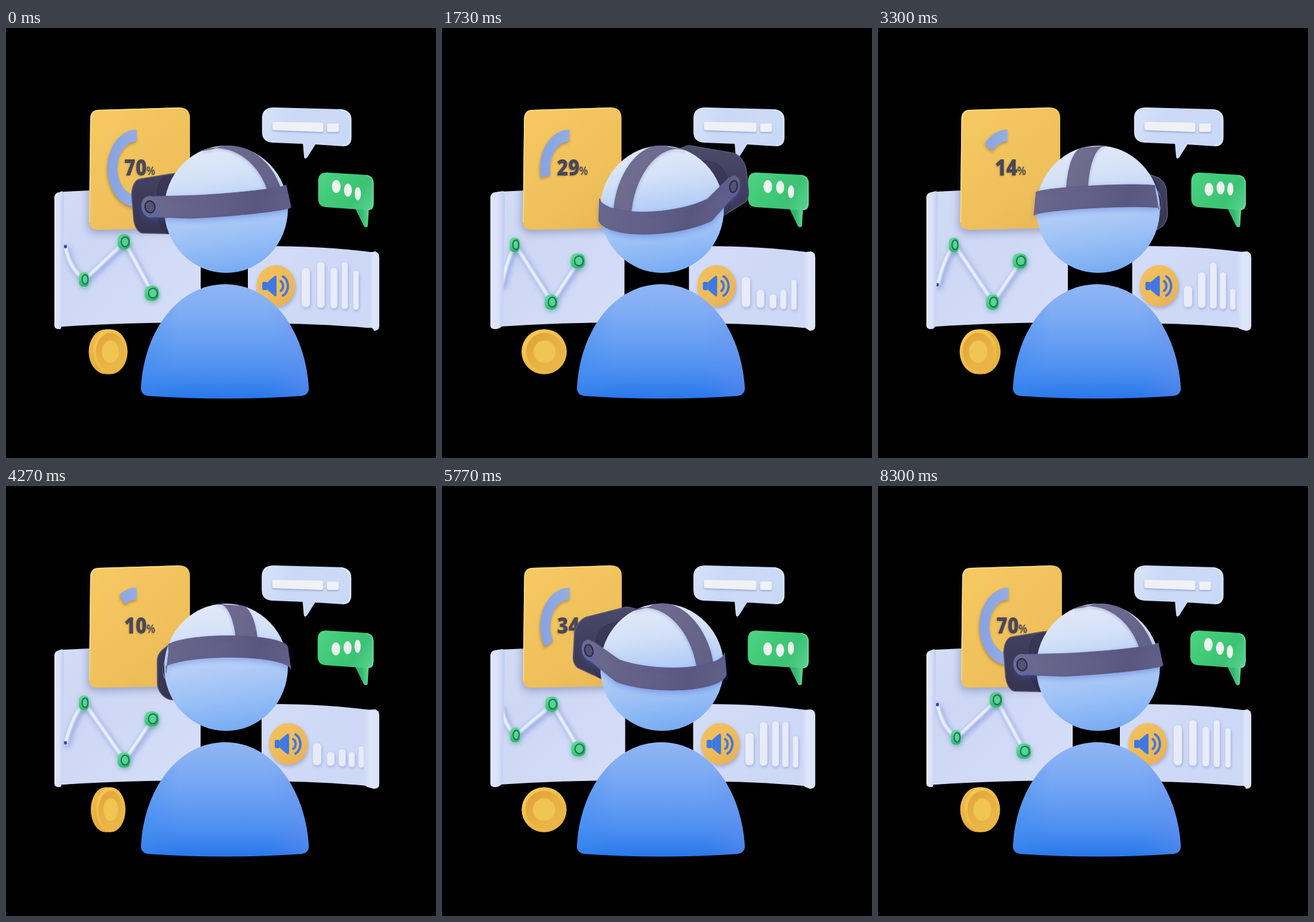
Animation of 720 by 720 pixels, one loop 8.33 s. Source, as an HTML page with a canvas:

```html
<!DOCTYPE html>
<html>
<head>
<meta charset="utf-8">
<style>
html, body { margin: 0; width: 100%; height: 100%; overflow: hidden; background: #000; }
canvas { display: block; width: 720px; height: 720px; }
</style>
</head>
<body>
<canvas id="stage" width="720" height="720"></canvas>
<script>
const ctx = document.getElementById('stage').getContext('2d');
const LOOP = 8330, TAU = Math.PI * 2, RAD = Math.PI / 180;

// Smooth periodic tracks through a few poses
const TIMES = [0, 1070, 2370, 4270, 5770, 6970, LOOP];
const GAUGE = [70, 39, 22, 10, 34, 62, 70];
const YAW = [-55, 28, 47, -20, -45, -52, -55];
const PITCH = [3.5, 26, 8.8, -11.5, 18, 6.6, 3.5];
const ROLL = [4.6, 7.5, 4.8, 0.5, -3, 1.5, 4.6];

function track(v, t) {
  const n = TIMES.length - 1;
  const slope = i => { const j = (i + n) % n; return (v[j + 1] - v[j]) / (TIMES[j + 1] - TIMES[j]); };
  const tangent = i => {
    const a = slope(i - 1), b = slope(i);
    return a * b <= 0 ? 0 : 2 * a * b / (a + b);
  };
  let i = 0;
  while (i < n - 1 && t >= TIMES[i + 1]) i++;
  const h = TIMES[i + 1] - TIMES[i], u = (t - TIMES[i]) / h, w = 1 - u;
  return w * w * (1 + 2 * u) * v[i] + u * u * (3 - 2 * u) * v[i + 1] +
    h * u * w * (w * tangent(i) - u * tangent(i + 1));
}

const wave = (t, cycles, shift = 0) => Math.cos(TAU * (cycles * t / LOOP + shift));
const mix = (a, b, u) => a + (b - a) * u;
function ease(u) {
  u = Math.min(1, Math.max(0, u));
  return u < 0.5 ? 4 * u * u * u : 1 - 4 * (1 - u) ** 3;
}

function ramp(x0, y0, x1, y1, ...colors) {
  const g = ctx.createLinearGradient(x0, y0, x1, y1);
  colors.forEach((c, i) => g.addColorStop(i / (colors.length - 1), c));
  return g;
}
function fillPath(d, style) {
  ctx.fillStyle = style;
  ctx.fill(new Path2D(d));
}
function oval(x, y, rx, ry, style) {
  ctx.beginPath();
  ctx.ellipse(x, y, rx, ry, 0, 0, TAU);
  ctx.fillStyle = style;
  ctx.fill();
}
function ring(x, y, rx, ry, style, width) {
  ctx.beginPath();
  ctx.ellipse(x, y, rx, ry, 0, 0, TAU);
  ctx.strokeStyle = style;
  ctx.lineWidth = width;
  ctx.stroke();
}
function pill(x, y, w, h, r, style) {
  ctx.beginPath();
  ctx.roundRect(x, y, w, h, r);
  ctx.fillStyle = style;
  ctx.fill();
}
function shade(color, blur, x, y) {
  ctx.shadowColor = color;
  ctx.shadowBlur = blur;
  ctx.shadowOffsetX = x;
  ctx.shadowOffsetY = y;
}
const unshade = () => shade('transparent', 0, 0, 0);

function chartPanel(t) {
  const s = wave(t, 2), right = 315 + 11 * s, tab = 101.5 - 4.5 * s;
  fillPath(`M81 283Q82 276 98 274L140 272L${right} 268V493Q200 493 96 500L82 500Z`,
    ramp(81, 274, 300, 495, '#d3dcf5', '#cdd7f4', '#d1daf6', '#d6def8'));

  const p = t < 4200 ? ease(t / 1040) : 1 - ease((t - 4700) / 1450);
  const nodes = [
    [126.7 + 4.7 * s, mix(421, 363, p), 8, 12],
    [190.5 + 8 * s, mix(358, 459, p), 10.5, 12.5],
    [236 + 9 * s, mix(444, 390, p), 12, 12.5]
  ];
  const start = [99.5, mix(366, 430, p)];
  const line = () => {
    ctx.beginPath();
    ctx.moveTo(...start);
    ctx.quadraticCurveTo(mix(105, 112, p) + s, mix(403, 379, p), nodes[0][0], nodes[0][1]);
    nodes.forEach(n => ctx.lineTo(n[0], n[1]));
    ctx.stroke();
  };
  ctx.lineCap = ctx.lineJoin = 'round';
  shade('rgba(70,100,200,.4)', 9, 3, 4);
  ctx.strokeStyle = '#c0cdf2';
  ctx.lineWidth = 9;
  line();
  unshade();
  ctx.strokeStyle = '#e6ecfa';
  ctx.lineWidth = 5;
  line();
  oval(start[0], start[1], 2.5, 3, '#2a4bbb');

  for (const [x, y, rx, ry] of nodes) {
    shade('rgba(40,140,110,.45)', 9, 1, 3);
    pill(x - rx - 1, y - ry, rx * 2, ry * 2, rx * 0.8, ramp(x - rx, y - ry, x + rx, y + ry, '#72dba2', '#3cc580', '#2baa6a'));
    unshade();
    ring(x + 1, y, rx * 0.62, ry * 0.66, '#147a49', 2);
    oval(x + 1, y, rx * 0.45, ry * 0.5, '#5cd096');
  }

  const tabFill = ramp(81, 0, tab, 0, '#e2e8fb', '#dbe2f9', '#c0cbee');
  fillPath(`M81 285Q81 276 89 275L${tab - 3} 273Q${tab + 1} 277 ${tab} 290L${tab - 3} 492Q${tab - 4} 503 91 504Q81 505 81 498Z`, tabFill);
}

function gaugePanel(t) {
  const s = wave(t, 2), l = 137 + 2 * s, r = 304 + 4 * s, cx = 216 + 3 * s;
  shade('rgba(20,35,100,.3)', 14, -2, 5);
  fillPath(`M${l + 2} 152Q${l + 2} 138 ${l + 15} 137L${r - 18} 133Q${r} 133 ${r} 151V320Q${r} 335 ${r - 15} 335L${l + 14} 338Q${l} 337 ${l} 324Z`,
    ramp(l, 135, r, 338, '#f6ca62', '#f2c45e', '#eebf5a', '#e8b755'));
  unshade();
  ctx.strokeStyle = 'rgba(250,220,135,.8)';
  ctx.lineWidth = 2;
  ctx.stroke(new Path2D(`M${l + 1} 325L${l + 3} 152Q${l + 4} 139 ${l + 16} 138L${r - 18} 134`));

  const value = track(GAUGE, t), end = -Math.PI / 2 - TAU * value / 100;
  ctx.save();
  ctx.translate(cx, 235);
  ctx.beginPath();
  ctx.ellipse(0, 0, 49, 65, 0, -Math.PI / 2, end, true);
  ctx.ellipse(0, 0, 32.5, 45, 0, end, -Math.PI / 2);
  ctx.closePath();
  shade('rgba(120,90,60,.5)', 5, -1, 3);
  ctx.fillStyle = ramp(-49, 0, 8, 0, '#86a2e2', '#97afe4');
  ctx.fill();
  shade('rgba(130,95,40,.5)', 3, -1, 1);
  ctx.scale(0.87, 1); // the panel is seen slightly from the side
  ctx.fillStyle = '#4a4757';
  ctx.textBaseline = 'alphabetic';
  ctx.font = '800 37px "Open Sans", sans-serif';
  ctx.fillText(Math.round(value), -24, 12);
  ctx.font = '600 20px "Open Sans", sans-serif';
  ctx.fillText('%', 18.5, 11);
  ctx.restore();
}

function soundPanel(t) {
  const s = wave(t, 1), l = 416.5 - 11.5 * s, tab = 602 + 5 * s, cx = 462.5 - 10.5 * s;
  fillPath(`M${l} 365Q530 364 618 376V502L604 502Q530 495 ${l} 494Z`,
    ramp(l, 365, 620, 500, '#d4dcf7', '#d0daf6', '#ccd8f6', '#cfdaf6'));

  shade('rgba(90,100,170,.4)', 6, 1, 3);
  oval(cx, 432, 32.5, 35, ramp(cx - 30, 405, cx + 30, 465, '#f2c05c', '#eebb5a', '#e6b058'));
  unshade();
  const blue = '#3f78e2';
  pill(cx - 23, 425, 9, 14, 3, blue);
  fillPath(`M${cx - 14} 425L${cx - 2} 415Q${cx + 1} 414 ${cx + 1} 418V446Q${cx + 1} 450 ${cx - 2} 449L${cx - 14} 439Z`, blue);
  ctx.strokeStyle = blue;
  ctx.lineWidth = 4;
  ctx.lineCap = 'round';
  [[7, 9], [15, 18]].forEach(([rx, ry]) => {
    ctx.beginPath();
    ctx.ellipse(cx + 5, 432, rx, ry, 0, -1.1, 1.1);
    ctx.stroke();
  });

  const mids = [511.5, 535.5, 556, 573, 590.5];
  const shifts = [0.14, 0, -0.14, 0, 0.14];
  mids.forEach((m, i) => {
    const x = m - (9.5 - 1.25 * i) * s, w = 14 - 1.25 * i;
    const top = 419 + (i === 4 ? 5 : 0) - 27 * wave(t, 3, shifts[i]);
    shade('rgba(80,100,190,.4)', 5, 1, 2);
    pill(x - w / 2, top, w, 467.5 + i - top, w * 0.45, '#e8ebf8');
  });
  unshade();

  fillPath(`M${tab} 384Q${tab} 375 ${tab + 7} 375L618 374Q625 376 625 384V499Q625 507 616 507L${tab + 8} 504Q${tab + 4} 503 ${tab + 3} 495Z`,
    ramp(tab, 0, 625, 0, '#cad5f4', '#dfe6fb', '#d9e1f9'));
}

function bubbles(t) {
  const a = -Math.cos(TAU * (t - 1640) / (LOOP / 2));
  const l = 425.3 + 4.3 * a, r = 576.3 + 2.8 * a, m = 502 + 4 * a;
  fillPath(`M${l} 151Q${l} 133 ${l + 20} 133L${r - 18} 136Q${r} 138 ${r} 153V183Q${r} 198 ${r - 14} 198L${m + 13} 195L${m - 1} 217Q${m - 5} 221 ${m - 6} 216L${m - 8} 194L${l + 18} 192Q${l} 191 ${l} 174Z`,
    ramp(l, 133, r, 198, '#d9e4f9', '#c9d8f6', '#ccdaf7', '#c6d8f8'));
  ctx.strokeStyle = 'rgba(228,238,252,.75)';
  ctx.lineWidth = 2;
  ctx.stroke(new Path2D(`M${r - 16} 137Q${r - 2} 140 ${r - 2} 155V182Q${r - 2} 196 ${r - 14} 197`));
  const x = l + 17.5, e = r - 21;
  shade('rgba(80,105,180,.4)', 3, 0, 2);
  fillPath(`M${x} 160Q${x} 157 ${x + 3} 157L${e - 29} 158.5Q${e - 26} 159 ${e - 26} 162V171Q${e - 26} 174 ${e - 29} 174L${x + 3} 171Q${x} 171 ${x} 168Z`, '#f0f1f4');
  pill(e - 20, 160, 20, 14, 3, '#f0f1f4');
  unshade();

  const b = -Math.cos(TAU * (t - 1500) / (LOOP / 2));
  const gl = 518.5 + 6.5 * b, gr = 615 + b, gm = 600.5 + 2 * b;
  fillPath(`M${gm - 18} 300L${gm - 3} 331Q${gm} 336 ${gm + 4} 332L${gm + 6} 300Z`, ramp(gm - 18, 0, gm + 6, 0, '#2fae66', '#36b96f', '#62d796'));
  fillPath(`M${gl} 257Q${gl} 242 ${gl + 14} 242L${gr - 12} 246Q${gr} 248 ${gr} 260V294Q${gr} 306 ${gr - 10} 305L${gl + 13} 300Q${gl} 299 ${gl} 285Z`,
    ramp(gl, 242, gr, 306, '#4fd385', '#41cb78', '#3cc274', '#5bd492'));
  ctx.strokeStyle = 'rgba(120,228,165,.6)';
  ctx.stroke(new Path2D(`M${gr - 11} 247Q${gr - 1} 250 ${gr - 1} 261V293Q${gr - 2} 304 ${gr - 10} 304`));
  [[550, 269, 4.7, 7.3, 0.1], [570, 271, 4, 6.7, 0.27], [587.2, 273, 3, 5.2, 0.5]].forEach(([dx, dy, k, rx, lag]) =>
    oval(dx + k * b, dy - 4.5 * wave(t, 1, -lag), rx, 11, '#eaf3ec'));
}

function coin(t) {
  const a = 40 * RAD + TAU * 2 * t / LOOP;
  let c = Math.cos(a), e = Math.sin(a);
  if (c < 0) { c = -c; e = -e; }
  const x = 171, y = 542, rx = Math.max(1, 37.5 * c), off = 6 * e;
  // edge: rear rim swept to the front face
  const edge = ramp(x - 38, y - 30, x + 38, y + 30, '#f0c050', '#e6ad3c', '#eab648');
  oval(x - off, y, rx, 37.5, edge);
  ctx.fillStyle = edge;
  ctx.fillRect(x - Math.abs(off), y - 37.5, Math.abs(off) * 2, 75);
  oval(x + off, y, rx, 37.5, ramp(x - 30, y - 38, x + 30, y + 38, '#f5cd5c', '#efbd48', '#e8b142'));
  oval(x + off, y, rx * 0.84, 31.5, ramp(x - 25, y - 30, x + 25, y + 30, '#e0a238', '#e8b043', '#ecb84a'));
  oval(x + off, y, rx * 0.5, 19, '#f0c552');
}

function torso() {
  const d = 'M226 603C231 505 290 429 367 429C444 429 501 505 507 603Q507 614 495 616Q367 625 238 616Q226 614 226 603Z';
  fillPath(d, ramp(367, 429, 367, 620, '#8fb5f4', '#7facf4', '#689ff3', '#4d90f1', '#2a78ea'));
  fillPath(d, ramp(226, 0, 290, 0, 'rgba(60,140,240,.4)', 'rgba(60,140,240,0)'));
  fillPath(d, ramp(440, 0, 507, 0, 'rgba(110,140,235,0)', 'rgba(110,140,235,.4)'));
}

// Head gear in local axes: x right, y up, z forward; the viewer sees the back
const LIFT = 14;
const strap = [];
for (let i = 0; i <= 6; i++) strap.push([mix(-68, -108, i / 6), mix(107, 0, i / 6), -0.955, 0.295, mix(17, 19, i / 6)]);
for (let i = 1; i < 48; i++) {
  const a = (i / 48 - 0.5) * Math.PI, sn = Math.sin(a), cs = Math.cos(a);
  strap.push([108 * sn, -108 * cs, sn, -cs, 19]);
}
for (let i = 0; i <= 6; i++) strap.push([mix(108, 68, i / 6), mix(0, 107, i / 6), 0.955, 0.295, mix(19, 17, i / 6)]);

function hull(pts) {
  pts.sort((a, b) => a[0] - b[0] || a[1] - b[1]);
  const half = list => list.reduce((h, p) => {
    while (h.length > 1) {
      const [a, b] = h.slice(-2);
      if ((b[0] - a[0]) * (p[1] - a[1]) - (b[1] - a[1]) * (p[0] - a[0]) > 0) break;
      h.pop();
    }
    h.push(p);
    return h;
  }, []);
  return half(pts).slice(0, -1).concat(half(pts.slice().reverse()).slice(0, -1));
}
function poly(pts, style, line, width = 1) {
  if (pts.length < 3) return;
  ctx.beginPath();
  pts.forEach(p => ctx.lineTo(p[0], p[1]));
  ctx.closePath();
  ctx.fillStyle = style;
  ctx.fill();
  if (line) {
    ctx.strokeStyle = line;
    ctx.lineWidth = width;
    ctx.stroke();
  }
}

function head(t) {
  const [yaw, pitch, roll] = [YAW, PITCH, ROLL].map(v => track(v, t) * RAD);
  const turn = (x, y, z) => {
    const X = x * Math.cos(yaw) + z * Math.sin(yaw), Z = x * Math.sin(yaw) - z * Math.cos(yaw);
    const Y = y * Math.cos(pitch) - Z * Math.sin(pitch);
    return [X * Math.cos(roll) - Y * Math.sin(roll), Y * Math.cos(roll) + X * Math.sin(roll), Z * Math.cos(pitch) + y * Math.sin(pitch)];
  };
  const place = (x, y, z) => {
    const p = turn(x, y, z);
    return [369 + p[0], 303.5 - p[1]];
  };
  const strapFill = ramp(235, 270, 477, 320, '#6f6d90', '#67648a', '#625f88', '#5a577f', '#63608a');

  const slab = (z, k) => {
    const pts = [];
    for (let i = 0; i < 60; i++) {
      const a = TAU * (i + 0.5) / 60, c = Math.cos(a), s = Math.sin(a);
      pts.push(place(k * (Math.sign(c) * 47 + 29 * c), LIFT + k * (Math.sign(s) * 19 + 29 * s), z));
    }
    return pts;
  };
  const back = slab(85, 1);
  poly(hull(back.concat(slab(140, 0.95))), ramp(0, 190, 0, 350, '#4e4c6c', '#3f3d5c', '#36344f'), '#5b5978', 1.5);
  poly(back, ramp(0, 190, 0, 350, '#42405c', '#383654', '#32304c'), '#302e48');

  // the strap follows the round of the head
  const onHead = (p, y) => {
    const k = Math.sqrt(1 - (y / 109) ** 2);
    return place(p[0] * k, y, p[1] * k);
  };
  const drawStrap = minZ => {
    const run = strap.filter(p => turn(p[2], 0, p[3])[2] > 0 && turn(p[0], LIFT, p[1])[2] > minZ);
    const top = run.map(p => onHead(p, LIFT + p[4]));
    const low = run.map(p => onHead(p, LIFT - p[4]));
    poly(top.concat(low.reverse()), strapFill, '#5c5980', 0.7);
    for (const side of [-1, 1]) {
      if (turn(side, 0, 0)[2] <= 0.05 || turn(side * 68, LIFT, 107)[2] <= minZ) continue;
      const disc = (r, out) => Array.from({ length: 32 }, (_, i) =>
        place(side * (68 + out), LIFT + r * Math.sin(i * TAU / 32), 107 + r * Math.cos(i * TAU / 32)));
      poly(disc(18, 0), strapFill);
      poly(disc(10, 1), '#55536f', '#29273d', 2);
    }
  };
  drawStrap(-200);

  oval(368.5, 303.5, 103.5, 106.5, ramp(350, 197, 380, 410, '#e2e9f8', '#d3e1f7', '#b3cdf7', '#98bff6', '#78abf3'));

  const left = [], right = [];
  for (let b = 4; b <= 176; b += 3) {
    const s = Math.sin(b * RAD), c = -Math.cos(b * RAD);
    if (turn(0, s, c)[2] < -0.12) continue;
    left.push(place(-19, 105 * s, 105 * c));
    right.push(place(19, 105 * s, 105 * c));
  }
  ctx.save();
  ctx.beginPath();
  ctx.ellipse(368.5, 303.5, 104.5, 107.5, 0, 0, TAU);
  ctx.clip();
  shade('rgba(70,90,180,.35)', 5, 0, 2);
  poly(left.concat(right.reverse()), ramp(300, 197, 450, 310, '#73718f', '#6b688c', '#625f88'), '#5f5c82', 0.8);
  ctx.restore();

  shade('rgba(60,90,200,.35)', 8, 0, 4);
  drawStrap(-35);
  unshade();
}

function frame(now) {
  const t = now % LOOP;
  ctx.fillStyle = '#000';
  ctx.fillRect(0, 0, 720, 720);
  chartPanel(t);
  gaugePanel(t);
  soundPanel(t);
  bubbles(t);
  coin(t);
  torso();
  head(t);
}

const begin = performance.now();
function tick() {
  frame(performance.now() - begin);
  requestAnimationFrame(tick);
}
tick();
</script>
</body>
</html>
```
